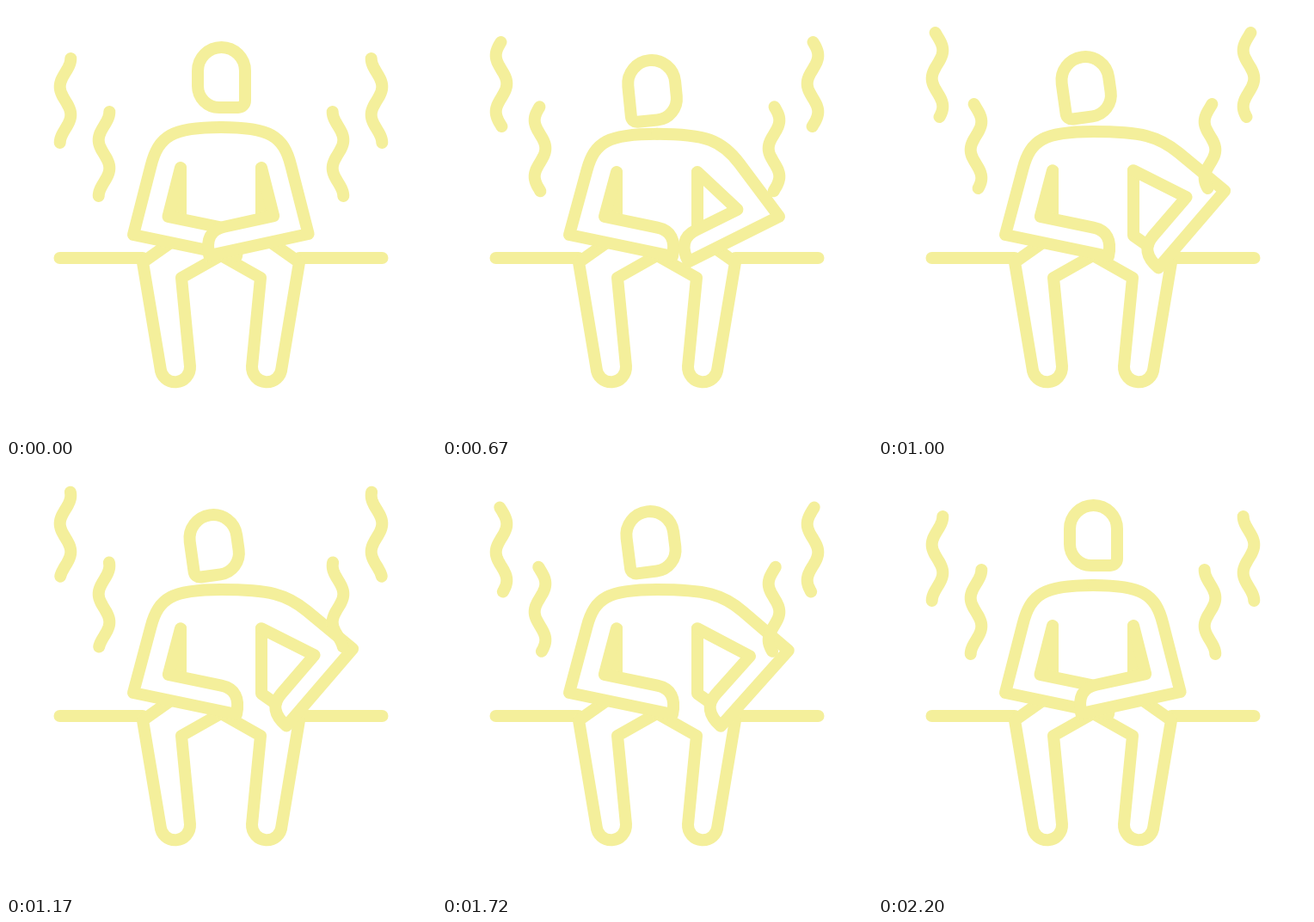
Animation, 500 px wide and 500 px high, one loop 2.22 s. Source, as an HTML page:

```html
<!DOCTYPE html>
<html lang="en">
<head>
<meta charset="utf-8">
<title>Sauna</title>
<style>
  html, body { margin: 0; width: 100%; height: 100%; overflow: hidden; background: #fff; }
  svg { display: block; width: 100vw; height: 100vh; }
  .ink { fill: none; stroke: #f4ef9b; stroke-width: 14; stroke-linecap: round; stroke-linejoin: round; }
  .solid { fill: #fff; }
</style>
</head>
<body>
<svg viewBox="0 0 500 500">
  <g class="ink">
    <g id="half">
      <path d="M62.500 293H159"/>
      <path id="leg"/>
      <path id="outer"/>
    </g>
    <use href="#half" transform="matrix(-1 0 0 1 500 0)"/>
    <path id="left" class="solid" transform="matrix(-1 0 0 1 500 0)"/>
    <path id="right" class="solid"/>
    <path id="head"/>
    <path id="inner"/>
    <use href="#inner" transform="matrix(-1 0 0 1 500 0)"/>
  </g>
</svg>
<script>
const LOOP = 2220, START = 220, END = 2200;
const $ = id => document.getElementById(id);
const setPath = (id, d) => $(id).setAttribute('d', d);
const mix = (a, b, u) => a + (b - a) * u;
const clamp = u => Math.min(1, Math.max(0, u));
const smooth = (t, from, to) => {
  const u = clamp((t - from) / (to - from));
  return u * u * (3 - 2 * u);
};

// Points are [x, y]
const add = (p, d, k) => [p[0] + d[0] * k, p[1] + d[1] * k];
const toward = (p, q) => {
  const dx = q[0] - p[0], dy = q[1] - p[1], len = Math.hypot(dx, dy);
  return [dx / len, dy / len];
};
const polar = (p, len, deg) => {
  const a = deg * Math.PI / 180;
  return [p[0] + len * Math.sin(a), p[1] + len * Math.cos(a)];
};

// A bent sleeve: the inner edge runs parallel to the outer one
function armPath(shoulder, elbow, hand, pit) {
  const upper = toward(shoulder, elbow), fore = toward(elbow, hand);
  const upperWidth = 34, foreWidth = 29;
  const cross = upper[0] * fore[1] - upper[1] * fore[0];
  const crook = add(add(elbow, fore, upperWidth / cross), upper, -foreWidth / cross);
  const knuckle = add(hand, [-fore[1], fore[0]], foreWidth);
  const wrist = add(knuckle, fore, -24);
  const along = k => [mix(shoulder[0], elbow[0], k), mix(shoulder[1], elbow[1], k)];
  const neck = shoulder[1];
  return `M250 ${neck}C307 ${neck} ${along(0.08)} ${along(0.36)}L${elbow}L${hand}`
    + `Q${knuckle} ${wrist}L${crook}L${pit}`;
}

function headPath(turn) {
  const a = mix(25, 7, turn), b = mix(8, 25, turn), w = 27.5, h = 35;
  return `M${-w} -7.500A${w} ${w} 0 0 1 ${w} -7.500V${h - b}A${b} ${b} 0 0 1 ${w - b} ${h}`
    + `H${a - w}A${a} ${a} 0 0 1 ${-w} ${h - a}Z`;
}

function steamPath(x, top, flow) {
  const points = [];
  for (let y = 0; y <= 98; y += 2) {
    points.push([x + 6.3 * Math.cos(2 * Math.PI * (y + flow) / 65.5), top + y]);
  }
  return 'M' + points.join('L');
}

function drawBody(t) {
  const dip = 8 * smooth(t, START, 450) - 3 * smooth(t, 600, 950) - 5 * smooth(t, 1720, 2000);
  const shoulder = [320, 141 + dip], pit = [297, 188 + 0.65 * dip];

  // The arm swings out with growing speed and returns the same way
  const swing = Math.min(clamp((t - START) / 570), clamp((END - t) / 485)) ** 2;
  const elbow = polar(shoulder, 128 - 20 * swing ** 2, 14.3 + 36 * swing);
  const bend = 12.3 - 54 * swing + 175 * swing ** 2 - 84 * swing ** 3;
  const hand = polar(elbow, 118, bend - 90);

  setPath('right', armPath(shoulder, elbow, hand, pit));
  setPath('left', armPath(shoulder, [352, 266], [232, 291], pit));
  setPath('leg', `M203 ${pit[1]}V267L159 298L179.500 421A17.200 17.200 0 0 0 214 419L204 316L250 290`);
}

function drawHead(t) {
  const lean = smooth(t, START, 920) - smooth(t, 1620, 2150);
  const turn = smooth(t, START, 620) - smooth(t, 1750, 2100);
  const y = 83 + 15 * smooth(t, START, 560) - 4 * smooth(t, 650, 950)
    - 17 * smooth(t, 1640, 1900) + 6 * smooth(t, 1930, END);
  setPath('head', headPath(turn));
  $('head').setAttribute('transform', `translate(${250.5 - 8.5 * lean} ${y}) rotate(${-8 * lean})`);
}

function drawSteam(t) {
  const flow = 131 * smooth(t, START, END);
  const rise = smooth(t, 200, 1000) - smooth(t, 1000, END);
  setPath('outer', steamPath(69, 61 - 30 * rise, flow));
  setPath('inner', steamPath(114, 123 - 9 * rise, flow));
}

function draw(t) {
  drawBody(t);
  drawHead(t);
  drawSteam(t);
}

const start = performance.now();
function tick(now) {
  draw(Math.max(0, now - start) % LOOP);
  requestAnimationFrame(tick);
}
draw(0);
requestAnimationFrame(tick);
</script>
</body>
</html>
```
